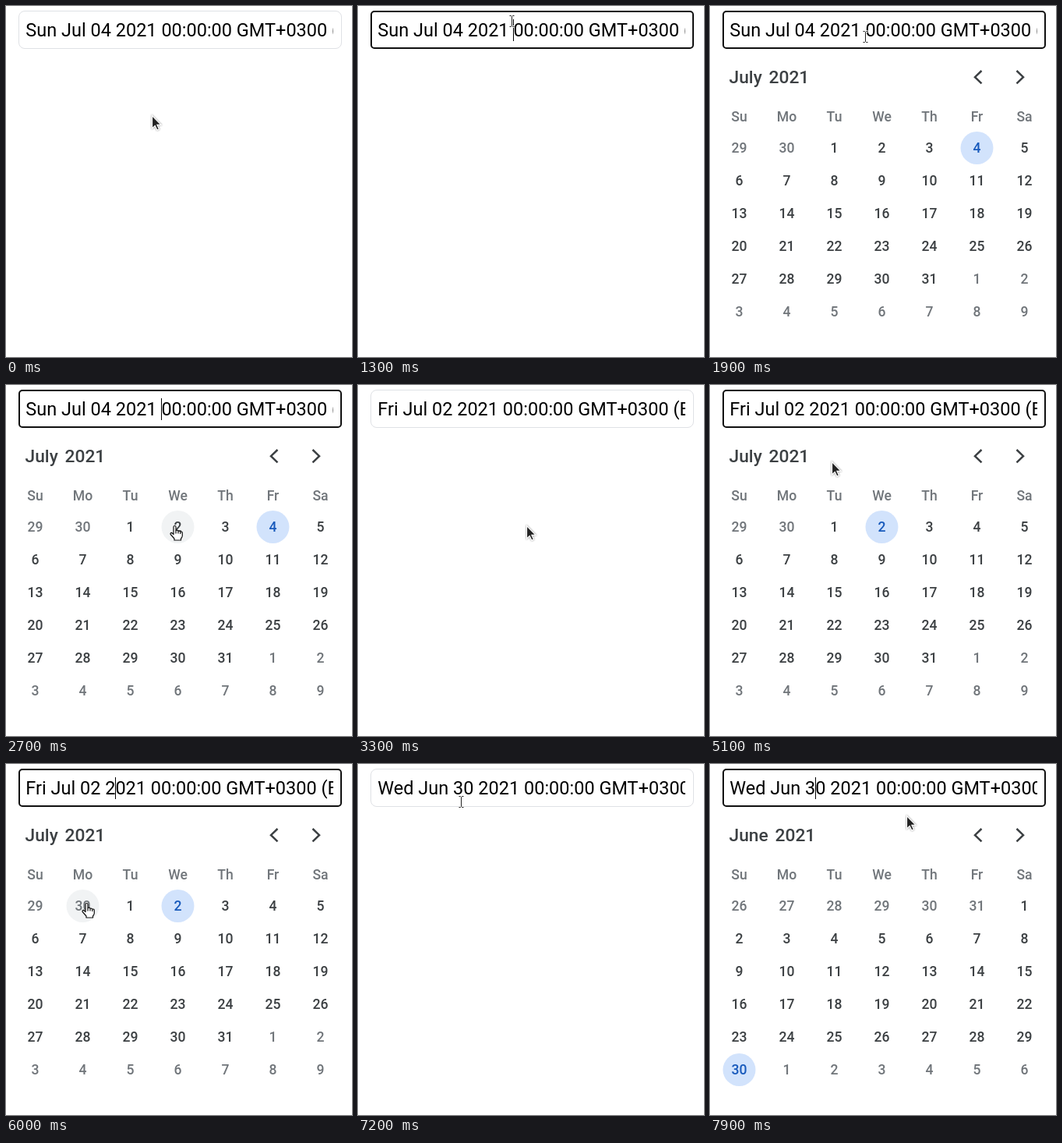
These frames come from a looping animation (444 by 450 pixels, 8 s). An HTML page:

```html
<!DOCTYPE html>
<html lang="en">
<head>
<meta charset="utf-8">
<title>Date picker</title>
<style>
  html, body { margin: 0; height: 100%; overflow: hidden; background: #fff; }
  svg { display: block; }
  text { font: 500 17.6px Roboto, sans-serif; fill: #3c4043; text-anchor: middle; }
  #value { font-size: 23.5px; font-weight: 400; fill: #000; text-anchor: start; white-space: pre; }
  .title { font-size: 22.8px; text-anchor: start; }
  .dim { fill: #70757a; }
  .on { fill: #185abc; }
</style>
</head>
<body>
<svg width="444" height="450" viewBox="0 0 444 450">
  <clipPath id="clip"><rect x="25" y="8" width="395" height="45"/></clipPath>
  <rect id="box" fill="#fff"/>
  <g clip-path="url(#clip)"><text id="value" x="25.3" y="39"></text></g>
  <rect id="caret" y="17" width="1" height="28"/>
  <g id="calendar">
    <text id="month" class="title" x="24.5" y="99"></text>
    <text id="year" class="title" y="99">2021</text>
    <path d="M348.5 83l-8.5 8.2 8.5 8.2M393.5 83l8.5 8.2-8.5 8.2" fill="none" stroke="#3c4043" stroke-width="2.5"/>
    <circle id="hover" r="21" fill="#f1f3f4"/>
    <circle id="chosen" r="21" fill="#d2e3fc"/>
    <g id="grid"></g>
  </g>
  <g id="pointer">
    <path id="arrow" d="M0 0V16.5L3.7 13 6.4 18.6 9 17.4 6.4 11.8H11.5Z" fill="#222" stroke="#fff" stroke-width="1.2" style="filter:drop-shadow(0 0 1px #888)"/>
    <g id="beam" fill="none">
      <path d="M-3-7H-1L0-6 1-7H3M0-6V6M-3 7H-1L0 6 1 7H3" stroke="#fff" stroke-width="3"/>
      <path d="M-3-7H-1L0-6 1-7H3M0-6V6M-3 7H-1L0 6 1 7H3" stroke="#222"/>
    </g>
    <g id="hand" stroke="#111" stroke-width="1.2" stroke-linejoin="round">
      <path d="M-1.5 11V1.5Q-1.5 0 0 0T1.5 1.5V6Q3.5 5 4.5 6.8 6.5 6 7.3 7.7 9.8 7 9.8 9.5V13Q9.5 15 8 16.2V18.5H-.5V16.5L-5.3 11Q-6 9-4 8.8Z" fill="#fff"/>
      <path d="M1.5 6V10M4.5 7V10M7.3 8V10.5" fill="none"/>
    </g>
  </g>
</svg>
<script>
const $ = id => document.getElementById(id);
const set = (el, attrs) => { for (const k in attrs) el.setAttribute(k, attrs[k]); };
const show = (id, on) => { $(id).style.display = on ? '' : 'none'; };
const colX = i => 37.5 + 61 * (i % 7);
const rowY = i => 182 + 42 * Math.floor(i / 7);

function label(x, y, str = '', cls = '') {
  const el = document.createElementNS('http://www.w3.org/2000/svg', 'text');
  set(el, { x, y, class: cls });
  el.textContent = str;
  return $('grid').appendChild(el);
}
['Su', 'Mo', 'Tu', 'We', 'Th', 'Fr', 'Sa'].forEach((d, i) => label(colX(i), 148, d, 'dim'));
const cells = Array.from({ length: 42 }, (_, i) => label(colX(i), rowY(i) + 6.2));

// first: column of day 1; prev and days: lengths of the previous and shown month
const july = { name: 'July', yearX: 75.5, first: 2, prev: 30, days: 31 };
const june = { name: 'June', yearX: 83.5, first: 6, prev: 31, days: 30 };
// Each visit to the field: focus, blur and calendar times, caret place
const visits = [
  { end: 3200, date: 'Sun Jul 04', month: july, day: 4, focus: 1300, open: 1500, blur: 3100, caret: 199 },
  { end: 6300, date: 'Fri Jul 02', month: july, day: 2, focus: 4500, open: 4800, blur: 6200, caret: 140 },
  { end: 8000, date: 'Wed Jun 30', month: june, day: 30, focus: 7400, open: 7600, blur: 8000, caret: 135 }
];
// Pointer path: time, x, y
const path = [
  [0, 187, 140], [900, 197, 19], [1700, 197, 19], [2600, 213, 179], [2700, 216, 180],
  [3500, 216, 180], [4400, 144, 32], [4700, 144, 32], [5600, 172, 190], [6000, 102.5, 178],
  [6600, 102.5, 178], [7200, 132, 48], [7400, 134, 32], [7500, 134, 32], [7900, 252, 66], [8000, 252, 66]
];

function pointerAt(t) {
  const i = path.findIndex(p => p[0] > t);
  const [t0, x0, y0] = path[i - 1], [t1, x1, y1] = path[i];
  const u = (t - t0) / (t1 - t0), e = u * u * (3 - 2 * u);
  return [x0 + (x1 - x0) * e, y0 + (y1 - y0) * e];
}

function drawMonth({ name, yearX, first, prev, days }, day) {
  $('month').textContent = name;
  set($('year'), { x: yearX });
  cells.forEach((el, i) => {
    const n = i - first + 1;
    el.textContent = n < 1 ? n + prev : n > days ? n - days : n;
    set(el, { class: n === day ? 'on' : n < 1 || n > days ? 'dim' : '' });
  });
  const i = first + day - 1;
  set($('chosen'), { cx: colX(i), cy: rowY(i) });
}

let shown;
function frame(now) {
  const t = Math.floor(now % 8000 / 100) * 100;
  const v = visits.find(v => t < v.end);
  const focused = t >= v.focus && t < v.blur, open = t >= v.open;
  if (v !== shown) {
    shown = v;
    drawMonth(v.month, v.day);
    $('value').textContent = v.date + ' 2021 00:00:00 GMT+0300 (Eastern European Summer Time)';
    set($('caret'), { x: v.caret });
  }
  set($('box'), focused
    ? { x: 17, y: 7, width: 413, height: 47, rx: 4, stroke: '#101010', 'stroke-width': 2 }
    : { x: 16.5, y: 6.5, width: 414, height: 48, rx: 7.5, stroke: '#dfe1e5', 'stroke-width': 1 });
  show('caret', focused && (t - v.focus) % 1200 < 600);
  show('calendar', open);

  const [x, y] = pointerAt(t);
  const over = open ? cells.findIndex((_, i) => Math.abs(x - colX(i)) < 21 && Math.abs(y - rowY(i)) < 21) : -1;
  show('hover', over >= 0);
  if (over >= 0) set($('hover'), { cx: colX(over), cy: rowY(over) });
  const inField = y < 55;
  show('beam', inField);
  show('hand', over >= 0);
  show('arrow', !inField && over < 0);
  set($('pointer'), { transform: `translate(${Math.round(x) + .5} ${Math.round(y) + .5})` });
}

const start = performance.now();
(function loop() {
  frame(performance.now() - start);
  requestAnimationFrame(loop);
})();
</script>
</body>
</html>
```
